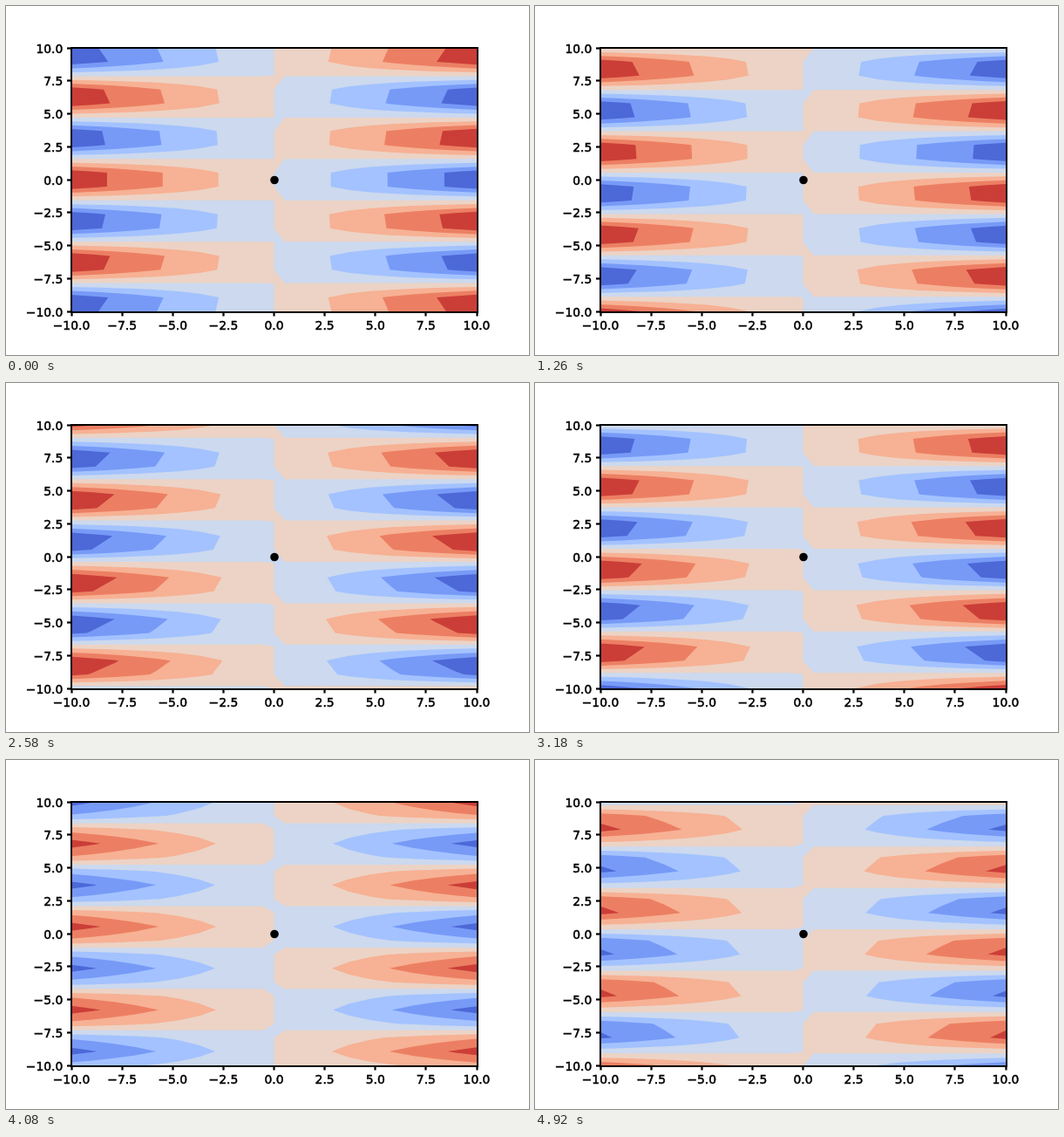
Write an HTML page with a canvas that moves like this. It is 600 px wide and 400 px high and loops after 4980 ms.

```html
<!DOCTYPE html>
<html lang="en">
<head>
<meta charset="utf-8">
<title>Travelling wave contours</title>
<style>
  html, body { margin: 0; width: 100%; height: 100%; overflow: hidden; background: #fff; }
  canvas { display: block; }
</style>
</head>
<body>
<canvas id="stage" width="600" height="400"></canvas>
<script>
const ctx = document.getElementById("stage").getContext("2d");

const STEP_MS = 60, STEPS = 83, PHASE_STEP = 0.1;
const N = 20, GAP = 20 / (N - 1), AMP = 20 / 19;
const LEFT = 75, RIGHT = 540, TOP = 48, BOTTOM = 350;
const COLORS = [
  [77, 104, 215], [119, 154, 247], [163, 194, 255], [204, 217, 238],
  [236, 211, 197], [247, 177, 148], [236, 127, 99], [203, 62, 56]
].map(c => `rgb(${c})`);

const grid = Array.from({ length: N }, (_, i) => -10 + i * GAP);
const px = x => (LEFT + RIGHT) / 2 + x * (RIGHT - LEFT) / 20;
const py = y => (TOP + BOTTOM) / 2 - y * (BOTTOM - TOP) / 20;

function addPolygon(points) {
  points.forEach(([x, y], i) => i ? ctx.lineTo(x, y) : ctx.moveTo(x, y));
  ctx.closePath();
}

// Adds the part of one grid cell that lies above the level.
function addCell(corners, level, joinHigh) {
  const inside = corners.map(c => c.z > level);
  const count = inside.filter(Boolean).length;
  if (!count) return;

  const cross = k => {
    const a = corners[k], b = corners[(k + 1) % 4];
    const t = (level - a.z) / (b.z - a.z);
    return [a.x + (b.x - a.x) * t, a.y + (b.y - a.y) * t];
  };
  const saddle = count === 2 && inside[0] === inside[2];
  if (saddle && !joinHigh) {
    corners.forEach((c, k) => {
      if (inside[k]) addPolygon([cross((k + 3) % 4), [c.x, c.y], cross(k)]);
    });
    return;
  }
  const points = [];
  corners.forEach((c, k) => {
    if (inside[k]) points.push([c.x, c.y]);
    if (inside[k] !== inside[(k + 1) % 4]) points.push(cross(k));
  });
  addPolygon(points);
}

function drawContours(phase) {
  const wave = grid.map(y => Math.cos(y - phase));
  const peak = 10 * AMP * Math.max(...wave.map(Math.abs));
  const step = peak > 10 ? 3 : 2.5;
  const corner = (i, j) => ({ x: px(grid[i]), y: py(grid[j]), z: -AMP * grid[i] * wave[j] });

  ctx.fillStyle = COLORS[0];
  ctx.fillRect(LEFT, TOP, RIGHT - LEFT, BOTTOM - TOP);
  for (let n = 1; n < COLORS.length; n++) {
    const level = (n - 4) * step * (n < 4 ? 1.02 : 1);
    ctx.beginPath();
    for (let j = 0; j < N - 1; j++) {
      const joinHigh = wave[j] + wave[j + 1] > 0.08;
      for (let i = 0; i < N - 1; i++) {
        addCell([corner(i, j), corner(i + 1, j), corner(i + 1, j + 1), corner(i, j + 1)],
          level, joinHigh);
      }
    }
    ctx.fillStyle = COLORS[n];
    ctx.fill();
  }
}

function drawAxes() {
  ctx.fillStyle = ctx.strokeStyle = "#000";
  ctx.beginPath();
  ctx.arc(308, 199.5, 4.8, 0, 2 * Math.PI);
  ctx.fill();

  ctx.lineWidth = 2;
  ctx.strokeRect(LEFT, TOP, RIGHT - LEFT + 1, BOTTOM - TOP + 1);

  ctx.font = '13.89px "DejaVu Sans", sans-serif';
  const label = (text, x, y, align) => {
    ctx.textAlign = align;
    ctx.lineWidth = 0.5;
    ctx.strokeText(text, x, y);
    ctx.fillText(text, x, y);
  };
  for (let v = -10; v <= 10; v += 2.5) {
    const text = v.toFixed(1).replace("-", "\u2212");
    const x = Math.floor(px(v)) + 0.5, y = Math.floor(py(v)) + 0.5;
    ctx.fillRect(x - 1.1, BOTTOM, 2.2, 5.5);
    ctx.fillRect(LEFT - 5, y - 1.1, 5, 2.2);
    label(text, px(v), 371, "center");
    label(text, 65.3, y + 5, "right");
  }
}

function draw(now) {
  const step = Math.floor(now / STEP_MS) % STEPS;
  ctx.fillStyle = "#fff";
  ctx.fillRect(0, 0, 600, 400);
  drawContours(step * PHASE_STEP);
  drawAxes();
}

let start;
function tick(now) {
  start ??= now;
  draw(now - start);
  requestAnimationFrame(tick);
}
draw(0);
requestAnimationFrame(tick);
</script>
</body>
</html>
```
